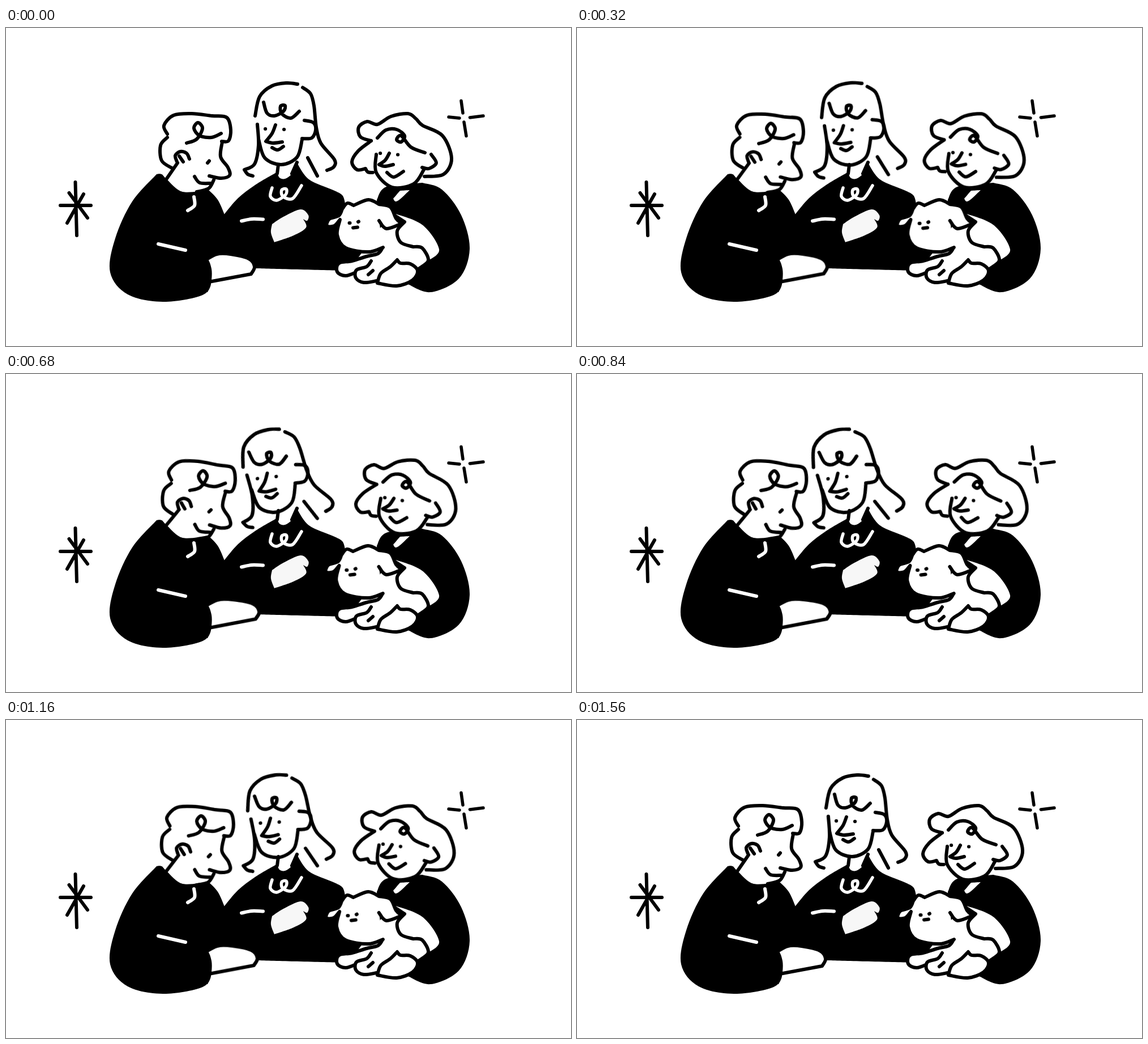
Recreate the animation shown at these times as an HTML page. Size 998x561 px, loop 1.6 s.

```html
<!DOCTYPE html>
<html lang="en">
<head>
<meta charset="utf-8">
<title>Three friends and a dog</title>
<style>
html, body { margin: 0; width: 100%; height: 100%; overflow: hidden; background: #fff; }
svg { display: block; width: 100%; height: 100%; }
path { fill: none; stroke: #000; stroke-width: 6; stroke-linecap: round; stroke-linejoin: round; }
.ink { fill: #000; stroke: none; }
.paper { fill: #fff; }
.bare { fill: #fff; stroke: none; }
.chalk { stroke: #fff; }
.thin { stroke-width: 5.5; }
.sway { animation: sway .8s cubic-bezier(.364, 0, .636, 1) infinite alternate; }
@keyframes sway { to { transform: var(--to); } }
#hand { --to: matrix(1.11, -.024, 0, 1, 0, 0); transform-origin: 358px 430px; }
#left { --to: matrix(1, .075, -.095, 1, 0, 0); transform-origin: 285px 268px; }
#hair { --to: matrix(1, -.15, .21, 1, 0, 0); transform-origin: 505px 262px; }
#face { --to: matrix(1, -.15, .1, 1, 0, 0); transform-origin: 505px 325px; }
#right { --to: matrix(1, .09, -.075, 1, 0, 0); transform-origin: 695px 335px; }
#dog { --to: scaleX(1.016); transform-origin: 690px 350px; }
#muzzle { --to: translate(-5.5px, 2px); }
</style>
</head>
<body>
<svg viewBox="0 0 998 561">
  <!-- sparkles -->
  <path d="M122.500 272L125 366M96 313H150M111.500 291L144 335M137 293L108 344"/>
  <path class="thin" d="M804 128.500L807 150M809 166L813 190.500M782 157L801 159M819.500 158L843 155"/>

  <!-- bodies -->
  <path class="ink" data-p="386,328 410,300 440,277 479,254|483,264 493,266 505,257 514,238|535,267 578,286 594,295 599,309|640,330|630,410|590,428|440,424|360,400"/>
  <path class="ink" data-p="266,258 275,258 284,267 312,289 357,285|374,303 386,329|445,365|440,418|362,420|362,450 345,472 277,483 215,470 184,431 193,371 223,306 266,258"/>
  <path class="ink" data-p="655,303 672,280 735,273|770,285 804,330 819,390 800,442 750,466 710,452|660,380"/>
  <path class="bare" data-p="684,301 696,287|713,286|696,302 688,306 684,301"/>

  <!-- clothes and hands -->
  <path class="chalk" data-p="332,298 333,313 321,322;269,381 317,392;416,340.5 434,337 454,337.5"/>
  <path class="chalk thin" data-p="470,282 467,297 478,304 494,294 495,284 487,286 489,297 506,301 522,278"/>
  <path class="ink" style="fill:#f7f7f7" data-p="470,346 490,333 520,320 534,330 532,340 525,337|530,352 508,366 474,378|468,361 470,346"/>
  <path id="hand" class="paper sway" data-p="350,411 372,399 397,399 429,407 439,421 433,434|358,448"/>
  <path class="ink" data-p="330,402|353,404 363,425 362,452 356,466|325,465"/>

  <g id="left" class="sway">
    <path data-p="285,187 279,172 296,154 328,151 364,155 390,158 397,180 393,199 381,200"/>
    <path data-p="319,203 337,196 347,177 339,167 332,177 342,190 363,193 380,186"/>
    <path data-p="285,193 273,207 275,234 293,247;283,267 303,238;302,236 299,225 308,218 319,221 324,231;306,226 313,236"/>
    <path data-p="382,201 379,227 392,246 395,260 380,265 359,261;333,262 342,273 361,274;367,268 358,283 337,289;356,238 359,234.5"/>
  </g>

  <path data-p="481,241 479,257;514,237 505,257"/>
  <g id="hair" class="sway">
    <path data-p="440,155 448,121 470,102 496,97 515,99;524,105 538,116 544,137 548,175 556,203 580,232 579,245 567,251"/>
    <path data-p="444,170 446,207 439,240 421,250|427,258 436,261;533,229 550,261"/>
    <path data-p="455,131 461,150 474,155 490,147 493,137 485,138 487,151 503,159 518,147"/>
  </g>
  <g id="face" class="sway">
    <path data-p="446,196 457,229 486,241 514,228 523,197;527,163 543,167 547,180 540,194 523,195"/>
    <path data-p="476,171 470,186 459,200|471,203 488,201;470,211 480,215 490,209;458,178 458.2,178;491,179 491.2,179"/>
  </g>

  <g id="right" class="sway">
    <path class="paper" data-p="654,223 654,255 682,281 720,275 738,250"/>
    <path data-p="645,199 626,192 623,175 638,165 656,170 680,156 710,151 724,160 736,172 771,190 787,230 773,258 739,262"/>
    <path data-p="645,199 622,217 611,236 620,250 635,248|639,254 648,255"/>
    <path data-p="656,194 671,180 690,179 704,190 698,201 690,197 698,190 715,210 740,220"/>
    <path data-p="751,223 760,238 747,248 735,246;677,221 670,233 659,241|669,244 684,241;673,255 685,263 702,253;661,221 661.2,221;692,223.5 692.2,223.5"/>
  </g>

  <!-- dog -->
  <path class="bare" data-p="682,326 735,347 765,390 747,410|728,425|640,446|612,420|640,380"/>
  <path data-p="684,329 704,342|691,358 697,378 719,386|735,388 746,410 730,424"/>
  <path class="paper" data-p="665,388 657,398 637,403 611,411 588,415 585,430 600,437 623,429"/>
  <path class="paper" data-p="645,411 637,421 619,427 618,441 632,449 655,446;640,435 648,428"/>
  <path class="paper" data-p="656,450 662,433 679,421 691,409|697,415 714,416 727,428 718,445 690,455 656,450"/>
  <path id="dog" class="paper sway" data-p="659,340 672,354 699,345|689,336 679,316 659,311|640,303 614,313|603,309 594,319|588,331 571,337 567,349 580,349 590,338|585,365 600,388 640,395 666,387"/>
  <path id="muzzle" class="sway" data-p="606.5,344 607.5,344;622,342 623,341.5;613,352.5 621,351.5"/>
</svg>
<script>
// Smooth curve through points; "|" makes a corner, ";" lifts the pen.
const curve = pts => pts.slice(1).map((end, i) => {
  const start = pts[i], before = pts[i - 1] || start, after = pts[i + 2] || end;
  const c1 = start.map((v, k) => v + (end[k] - before[k]) / 6);
  const c2 = end.map((v, k) => v - (after[k] - start[k]) / 6);
  return `C${[c1, c2, end]}`;
}).join('');

const stroke = text => {
  let last, d = '';
  for (const run of text.split('|')) {
    const pts = run.split(' ').map(p => p.split(',').map(Number));
    if (last) pts.unshift(last);
    else d = `M${pts[0]}`;
    d += curve(pts);
    last = pts.at(-1);
  }
  return d;
};

for (const path of document.querySelectorAll('[data-p]'))
  path.setAttribute('d', path.dataset.p.split(';').map(stroke).join(''));
</script>
</body>
</html>
```
